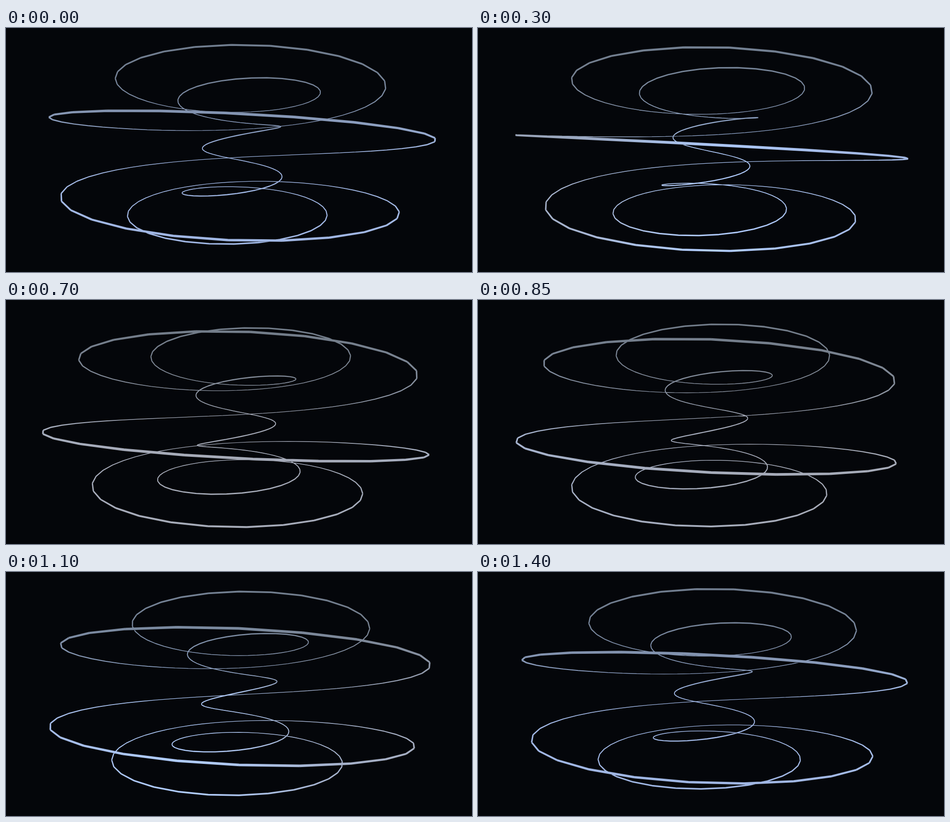
An HTML page with a canvas for the animation above (1.45 s loop, 1032 by 543 pixels).

```html
<!DOCTYPE html>
<html lang="en">
<head>
<meta charset="utf-8">
<title>Toroidal coil</title>
<style>
  html, body { margin: 0; width: 100%; height: 100%; overflow: hidden; background: #04060a; }
  canvas { display: block; width: 1032px; height: 543px; }
</style>
</head>
<body>
<canvas id="stage" width="1032" height="543"></canvas>
<script>
const W = 1032, H = 543;
const STEP = 50, STEPS = 29;
const RING = 200, TUBE = 120, TURNS = 7, POINTS = 280;
const EYE = 468.5, LINE = 2;
const TAU = 2 * Math.PI, RAD = Math.PI / 180;

const ctx = document.getElementById('stage').getContext('2d');

// Swings between periwinkle and grey, with a pale blue glow on the way
function tint(phase) {
  const c = Math.cos(TAU * phase);
  const glow = Math.exp(-(((c - 0.25) / 0.4) ** 2));
  const r = 162.5 - 3.5 * c + 14 * glow;
  const g = 176 + 5 * c + 26 * glow;
  const b = 205 + 21 * c + 40 * glow;
  return `rgb(${Math.round(r)}, ${Math.round(g)}, ${Math.round(b)})`;
}

// Point of a closed coil on a torus, turned about its axis and seen in perspective
function project(i, turn) {
  const u = i / POINTS * TAU;
  const angle = TURNS * u + turn;
  const r = RING + TUBE * Math.cos(u);
  const scale = EYE / (EYE - r * Math.sin(angle));
  return {
    x: W / 2 + r * Math.cos(angle) * scale,
    y: H / 2 - TUBE * Math.sin(u) * scale,
    half: LINE * scale / 2
  };
}

function addSegment(a, b) {
  const dx = b.x - a.x, dy = b.y - a.y;
  const len = Math.hypot(dx, dy) || 1;
  const nx = -dy / len, ny = dx / len;
  ctx.moveTo(a.x + nx * a.half, a.y + ny * a.half);
  ctx.lineTo(b.x + nx * b.half, b.y + ny * b.half);
  ctx.lineTo(b.x - nx * b.half, b.y - ny * b.half);
  ctx.lineTo(a.x - nx * a.half, a.y - ny * a.half);
  ctx.closePath();
}

function gradient(x, y, stops, color) {
  const g = ctx.createLinearGradient(0, 0, x, y);
  for (let i = 0; i <= stops; i++) g.addColorStop(i / stops, color(i / stops));
  return g;
}

function paint(mode, fill) {
  ctx.globalCompositeOperation = mode;
  ctx.fillStyle = fill;
  ctx.fillRect(0, 0, W, H);
}

// Dims the upper half
const shade = gradient(0, H, 40, k => {
  const s = Math.min(1, Math.max(0, (k * H - 40) / 230));
  return `rgba(104, 115, 128, ${0.85 * (1 - s * s)})`;
});

function draw(step) {
  const turn = (1.8 + 12.6 * step) * RAD;
  ctx.globalCompositeOperation = 'source-over';
  ctx.clearRect(0, 0, W, H);
  ctx.fillStyle = '#fff';
  ctx.beginPath();
  let last = project(0, turn);
  for (let i = 1; i <= POINTS; i++) {
    const next = project(i, turn);
    addSegment(last, next);
    last = next;
  }
  ctx.fill();
  paint('source-in', gradient(W, 0, 24, k => tint(step / STEPS + 0.288 * (0.5 - k))));
  paint('source-atop', shade);
}

let shown = -1;
function tick(now) {
  const step = Math.floor(now / STEP) % STEPS;
  if (step !== shown) draw(shown = step);
  requestAnimationFrame(tick);
}
draw(0);
requestAnimationFrame(tick);
</script>
</body>
</html>
```
